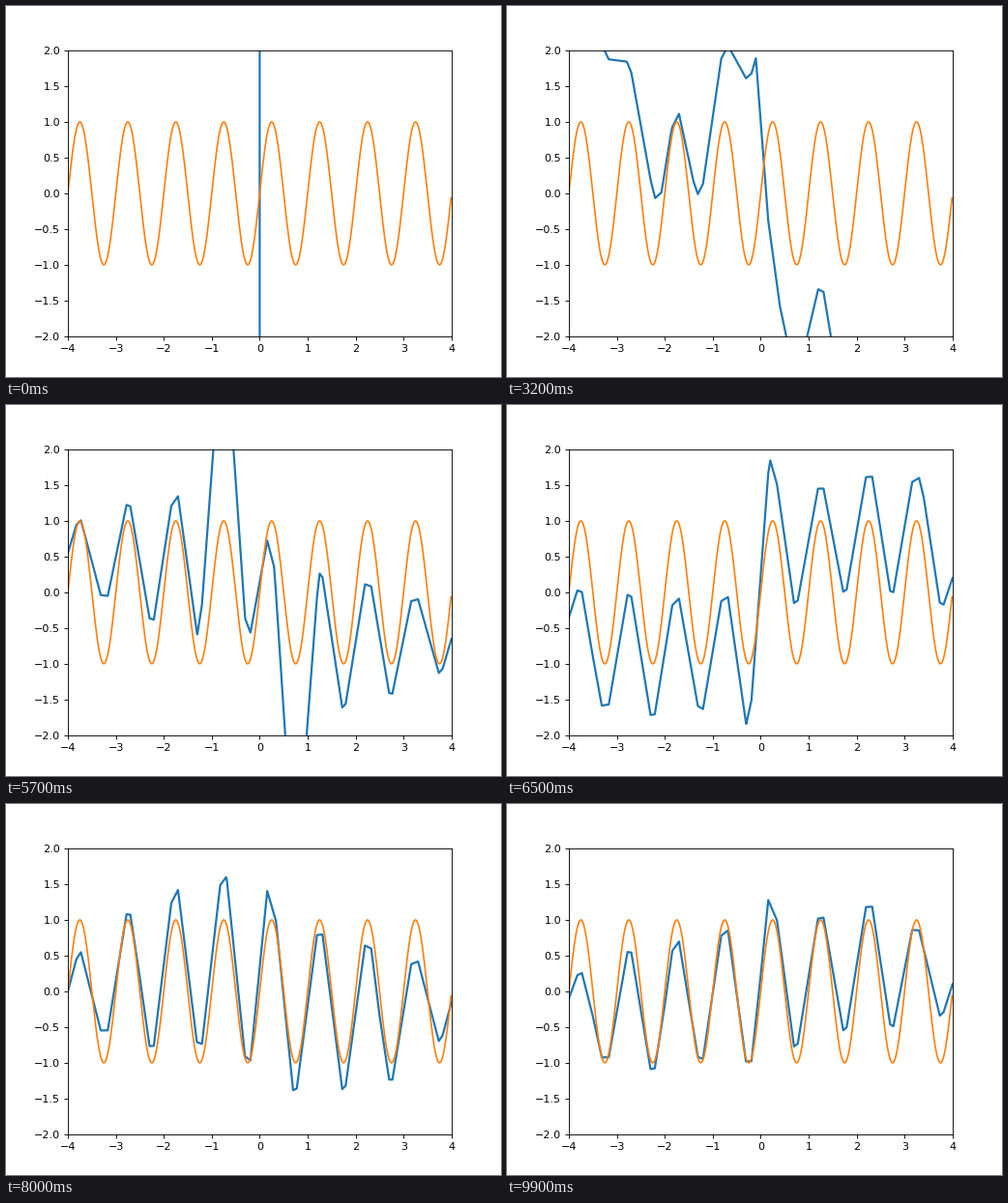
A matplotlib script for the animation above (10 s loop, 512 px wide and 384 px high).

```python
import numpy as np
import matplotlib.pyplot as plt
from matplotlib.animation import FuncAnimation

FRAMES, INTERVAL = 100, 100
SWING_X = (0, 1.3, 2.6, 4)

# Training stages: step, key points of the slow level the curve swings around,
# and the swing's height at the distances SWING_X from the centre.
STAGES = [
    (0, [(-4, 500), (-.006, 500), (.006, -500), (4, -500)], (0, 0, 0, 0)),
    (18, [(-4, 16), (-2.2, 1.45), (-2.07, 1.11), (-1.87, 2), (-.1, 7.8),
          (.4, -14), (4, -25)], (0, 0, 0, 0)),
    (44, [(-4, -.4), (-3.6, .25), (-2.8, 0), (-1.4, -.8), (-.4, .5),
          (1.2, .5), (2.2, -.5), (3.6, -.4), (4, .36)], (.7, 1.4, .65, 0)),
    (57, [(-4, .55), (-1.3, .4), (-.75, 2.8), (-.3, .6), (.3, -.6),
          (.75, -3), (1.25, -.7), (4, -.65)], (1, 1, .8, .4)),
    (65, [(-4, -.35), (-3.5, -.9), (-.3, -.85), (.2, .7), (3.4, .9),
          (4, .2)], (1.1, .75, .9, .6)),
    (80, [(-4, 0), (-2.5, .2), (-.7, .5), (.7, -.2), (2.5, -.35),
          (4, -.15)], (1.3, 1.15, 1, .4)),
    (99, [(-4, -.1), (-3.5, -.35), (-2, -.2), (0, .1), (2.5, .4),
          (4, .1)], (1.15, .85, .9, .4)),
]
STEPS = [step for step, _, _ in STAGES]


def wave(x):
    return np.sin(2 * np.pi * x)


# Two kinks around every peak and trough, slightly uneven.
rng = np.random.default_rng(4)
peaks = np.arange(-3.75, 4, .5)
kinks = np.concatenate([peaks - .06, peaks + .06])
kinks = np.sort(kinks + rng.normal(0, .02, kinks.size))
detail = rng.normal(0, .1, kinks.size) * np.exp(-(kinks / 1.6) ** 2)


def fit(step):
    """Corners of the fitted curve after the given number of steps."""
    i = min(np.searchsorted(STEPS, step, side="right") - 1, len(STEPS) - 2)
    (t0, level0, swing0), (t1, level1, swing1) = STAGES[i:i + 2]
    u = (step - t0) / (t1 - t0)
    (xa, ya), (xb, yb) = np.array(level0).T, np.array(level1).T
    corners = [kinks] + [xa] * (u < 1) + [xb] * (u > 0)
    x = np.unique(np.concatenate(corners))

    # asinh makes huge values shrink geometrically, small ones linearly
    level = np.sinh((1 - u) * np.arcsinh(np.interp(x, xa, ya))
                    + u * np.arcsinh(np.interp(x, xb, yb)))
    heights = (1 - u) * np.array(swing0) + u * np.array(swing1)
    swing = np.interp(abs(x), SWING_X, heights)

    # training jitter between stages, calming down towards the end
    size = .03 + .2 * (1 - step / FRAMES)
    size *= min(1, (step - t0) / 3, (t1 - step) / 3)
    noise = np.random.default_rng(step).normal(0, size, 9)
    jitter = np.interp(x, np.linspace(-4, 4, 9), noise)

    return x, level + swing * (wave(x) + np.interp(x, kinks, detail)) + jitter


fig, ax = plt.subplots(figsize=(6.4, 4.8), dpi=80)
ax.set_xlim(-4, 4)
ax.set_ylim(-2, 2)
xs = np.arange(-4, 4, .01)
line, = ax.plot([], [], color="C0", lw=2)
ax.plot(xs, wave(xs), color="C1", lw=1.5)


def update(frame):
    line.set_data(*fit(frame))
    return line,


anim = FuncAnimation(fig, update, frames=FRAMES, interval=INTERVAL,
                     repeat=True, repeat_delay=0)
plt.show()
```
